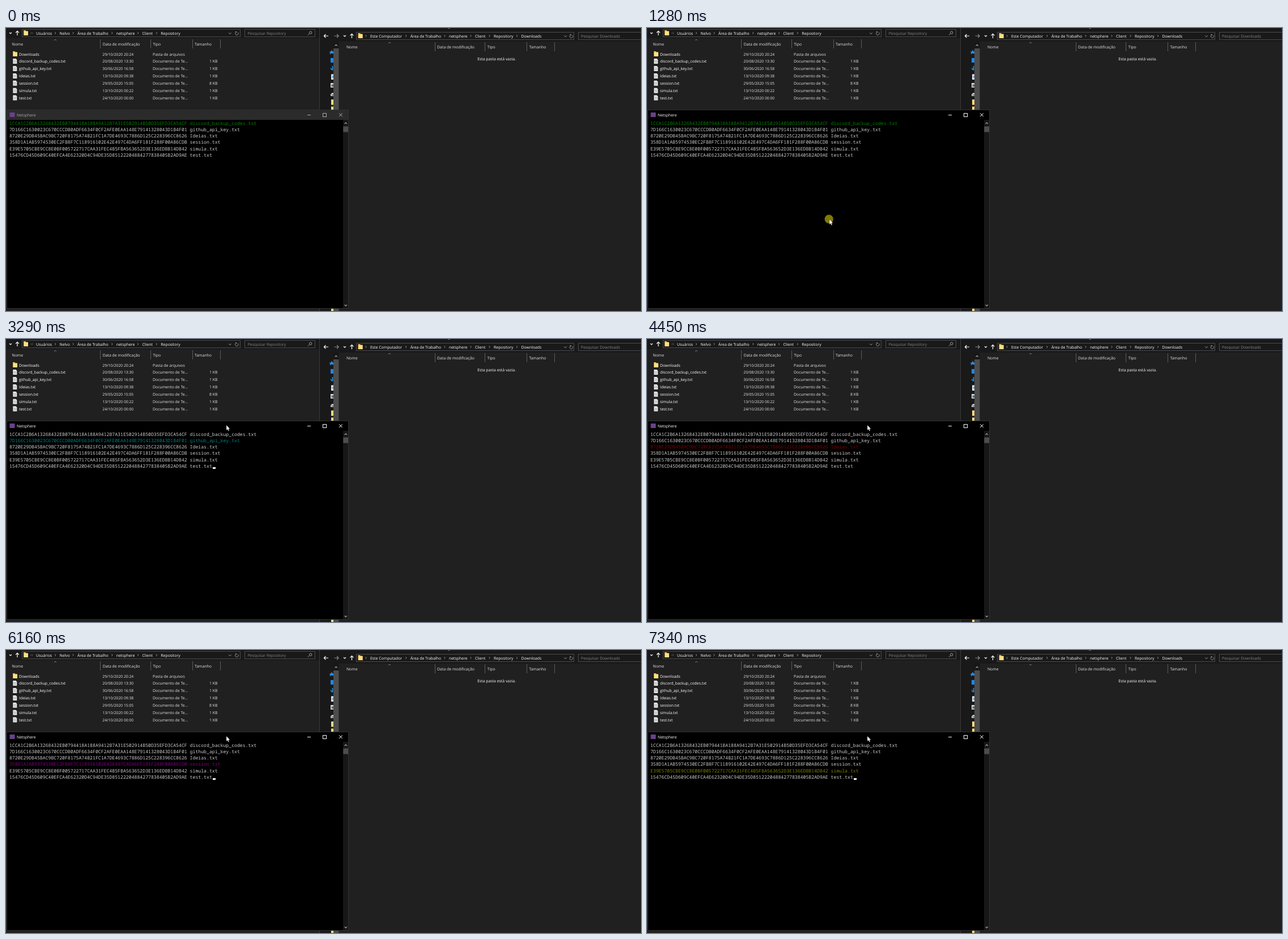
These frames come from a looping animation (1121x499 px, 8000 ms). An HTML page:

```html
<!DOCTYPE html>
<html lang="pt">
<head>
<meta charset="utf-8">
<title>Netsphere</title>
<style>
html, body { margin: 0; width: 100%; height: 100%; overflow: hidden; background: #202020; }
svg { display: block; width: 1121px; height: 499px; }
text { font: 500 6.9px "Open Sans", "Noto Sans", sans-serif; fill: #fff; white-space: pre; text-rendering: geometricPrecision; }
.head { font-weight: 400; fill: #e4e4e4; }
.date { font-size: 6.75px; }
.dim { font-weight: 400; fill: #848484; }
.end { text-anchor: end; }
.mid { text-anchor: middle; }
.mono { font: 8.19px "Noto Sans Mono", "DejaVu Sans Mono", monospace; fill: #ccc; }

/* percent = milliseconds / 80 */
.mono, .bar, .title, .button, .caret, .click { animation: 8s step-end infinite; }
.row0 { animation-name: row0; }
.row1 { animation-name: row1; }
.row2 { animation-name: row2; }
.row3 { animation-name: row3; }
.row4 { animation-name: row4; }
.row5 { animation-name: row5; }
@keyframes row0 { 0% { fill: #008000; } 40.125%, 100% { fill: #ccc; } }
@keyframes row1 { 40.125% { fill: #008080; } 55.625%, 100% { fill: #ccc; } }
@keyframes row2 { 55.625% { fill: #800000; } 77%, 100% { fill: #ccc; } }
@keyframes row3 { 77% { fill: #800080; } 81%, 100% { fill: #ccc; } }
@keyframes row4 { 81% { fill: #808000; } 84.875% { fill: #ccc; } 91.75%, 100% { fill: #808000; } }
@keyframes row5 { 84.875% { fill: #808080; } 91.75%, 100% { fill: #ccc; } }

.bar { animation-name: bar; }
.title { animation-name: title; }
.button { animation-name: button; }
@keyframes bar { 0% { fill: #2b2b2b; } 15%, 100% { fill: #000; } }
@keyframes title { 0% { fill: #aaa; } 15%, 100% { fill: #fff; } }
@keyframes button { 0% { stroke: #aaa; } 15%, 100% { stroke: #fff; } }

.caret { animation-name: caret; }
@keyframes caret {
  0%, 29.5%, 40.125%, 48.75%, 69.5% { opacity: 0; }
  22.875%, 36.125%, 41.125%, 56.625%, 75.125%, 100% { opacity: 1; }
}
.click { animation-name: click; }
@keyframes click { 0%, 17%, 100% { opacity: 0; } 15% { opacity: 1; } }

.mouse { animation: mouse 8s step-end infinite; }
@keyframes mouse {
  0% { opacity: 0; transform: translate(345px, 492px); }
  9.25% { opacity: 1; transform: translate(345px, 492px); animation-timing-function: steps(5); }
  14.125% { opacity: 1; transform: translate(322px, 337.3px); }
  18.75% { opacity: 1; transform: translate(322px, 337.3px); animation-timing-function: steps(10, start); }
  28.25% { opacity: 1; transform: translate(379.3px, 151.8px); }
  28.5% { opacity: 1; transform: translate(381px, 143px); }
  29.5% { opacity: 1; transform: translate(379.3px, 151.8px); }
  32.375% { opacity: 1; transform: translate(384px, 151.8px); }
  33.25%, 100% { opacity: 1; transform: translate(389px, 151.8px); }
}
</style>
</head>
<body>
<svg id="stage" viewBox="0 0 1121 499"></svg>
<script>
const parts = [];
const rect = (x, y, w, h, fill, extra = '') =>
  parts.push(`<rect x="${x}" y="${y}" width="${w}" height="${h}" fill="${fill}" ${extra}/>`);
const frame = (x, y, w, h, stroke, fill = 'none', cls = '') =>
  rect(x + .5, y + .5, w - 1, h - 1, fill, `stroke="${stroke}" class="${cls}"`);
const line = (d, stroke = '#fff', width = 1, cls = '') =>
  parts.push(`<path d="${d}" fill="none" stroke="${stroke}" stroke-width="${width}" class="${cls}"/>`);
const shape = (d, fill) => parts.push(`<path d="${d}" fill="${fill}"/>`);
// y is the middle of the capitals
const text = (x, y, str, cls = '') =>
  parts.push(`<text x="${x}" y="${y + 2.5}" class="${cls}">${str}</text>`);

const down = (x, y, c, s = 2.2, w = 1) => line(`M${x - s} ${y - s / 2}l${s} ${s} ${s} ${-s}`, c, w);
const up = (x, y, c, s = 2.2, w = 1) => line(`M${x - s} ${y + s / 2}l${s} ${-s} ${s} ${s}`, c, w);
const next = (x, y) => line(`M${x - .8} ${y - 1.7}l1.7 1.7 -1.7 1.7`, '#bbb', .8);
const upArrow = (x, y) => line(`M${x} ${y + 4}v-7.5M${x - 3} ${y - .6}l3 -3 3 3`, '#fff', 1.2);
const sideArrow = (x, y, dir, c) => line(`M${x - 4 * dir} ${y}h${7.6 * dir}m${-3 * dir} -3l${3 * dir} 3 ${-3 * dir} 3`, c, 1.2);
const refresh = (x, y) => line(`M${x + 2} ${y - 1.8}A2.8 2.8 0 1 1 ${x - 1.4} ${y - 2.4}M${x - 2.6} ${y - 3}h2v2`, '#aaa', .8);
const folder = (x, y) => {
  shape(`M${x} ${y}h3.6l1 1.4h3.4v7.6h-8z`, '#e8b84a');
  rect(x + 1, y + 1.8, 7, 7.2, '#ffdf86');
};
const file = (x, y) => {
  shape(`M${x} ${y}h5l2 2v7h-7z`, '#e9e9e9');
  for (let i = 0; i < 3; i++) line(`M${x + 1.3} ${y + 3.2 + i * 1.7}h4.4`, '#8d8d8d', .6);
};
const crumbs = (y, items) => items.forEach(([x, label], i) => {
  if (i) next(x - 7.5, y);
  text(x, y, label);
});
const columns = (x, y, sortX) => {
  [['Nome', 10.5], ['Data de modificação', 170.7], ['Tipo', 259.3], ['Tamanho', 333]]
    .forEach(([label, dx]) => text(x + dx, y, label, 'head'));
  [166.4, 255, 329, 378].forEach(dx => rect(Math.round(x + dx), y - 8, 1, 16, '#5c5c5c'));
  up(sortX, y - 7, '#999', 2, .8);
};

function leftExplorer() {
  rect(0, 0, 553, 18, '#191919');
  frame(28, 2, 386, 14, '#4c4c4c', '#191919');
  frame(421, 2, 125, 14, '#4c4c4c', '#191919');
  down(8, 9, '#fff', 2, 1.1);
  upArrow(20, 9);
  folder(31, 4);
  line('M45 7.5l-1.5 1.5 1.5 1.5M47.4 7.5l-1.5 1.5 1.5 1.5', '#777', .7);
  crumbs(9, [[53, 'Usuários'], [94.5, 'Nelvo'], [126, 'Área de Trabalho'], [194.7, 'netsphere'], [240.5, 'Client'], [273.3, 'Repository']]);
  down(395.5, 9.5, '#aaa');
  refresh(407.5, 9.5);
  text(426.7, 9, 'Pesquisar Repository', 'dim');
  line('M533 12.5l2.6-2.8M535.5 8.2a2.2 2.2 0 1 0 4.4 0a2.2 2.2 0 1 0-4.4 0', '#aaa', .9);
  columns(0, 28, 87);

  const rows = [
    ['Downloads', '29/10/2020 20:24'],
    ['discord_backup_codes.txt', '20/08/2020 13:30', 1],
    ['github_api_key.txt', '30/06/2020 16:58', 1],
    ['Ideias.txt', '13/10/2020 09:38', 1],
    ['session.txt', '29/05/2020 15:05', 8],
    ['simula.txt', '13/10/2020 00:22', 1],
    ['test.txt', '24/10/2020 00:00', 1]
  ];
  rows.forEach(([name, date, size], i) => {
    const y = 46 + i * 12.9;
    size ? file(12.3, y - 4.8) : folder(12, y - 5);
    text(23, y, name);
    text(170.3, y, date, 'date head');
    text(259, y, size ? 'Documento de Te...' : 'Pasta de arquivos', 'head');
    if (size) text(373.5, y, size + ' KB', 'end head');
  });
}

function rightExplorer() {
  rect(553, 0, 568, 499, '#202020');
  rect(553, 0, 568, 24, '#191919');
  rect(553, 24, 25, 475, '#191919');
  rect(553, 0, 1, 499, '#3a3a3a');
  line('M780 0l2 1 2-1', '#999', .8);
  sideArrow(565, 14, -1, '#fff');
  sideArrow(583.5, 14, 1, '#8a8a8a');
  down(598, 14, '#fff', 2, 1.1);
  upArrow(610.5, 14);
  frame(618, 7, 385, 14, '#4c4c4c', '#191919');
  frame(1010, 7, 120, 14, '#4c4c4c', '#191919');
  folder(621.5, 9);
  next(635.5, 14);
  crumbs(14, [[643, 'Este Computador'], [713.7, 'Área de Trabalho'], [782, 'netsphere'], [828, 'Client'], [861, 'Repository'], [909.5, 'Downloads']]);
  down(987.5, 14.5, '#aaa');
  refresh(998, 14.5);
  text(1015, 14, 'Pesquisar Downloads', 'dim');
  columns(590.4, 33, 677);
  text(866, 54.5, 'Esta pasta está vazia.', 'mid');

  // navigation pane, cut off by its scroll bar
  shape('M570 42l3.4-.6 1.6-3 1.6 3h1.4v4l-3-1-3.5 2 1-3.2z', '#2f8fe0');
  rect(573, 53, 5, 8, '#1e88e5');
  line('M576.5 67v7M573 71l3.5 3.5', '#1e9bf0', 1.6);
  rect(574, 81.5, 4, 9.5, '#e4eef6');
  rect(575.5, 84, 2.5, 4, '#7fa9cc');
  rect(573, 97, 5, 8, '#d5dadd');
  rect(574.5, 99.5, 3.5, 4, '#586a70');
  shape('M573 120v-3l2.5-2.5h2.5v5.5z', '#d0d0d0');
  rect(574.5, 117.5, 3.5, 1.2, '#444');
  [126, 138.5, 494].forEach(y => rect(574, y, 4, 9.5, '#ffdb7d'));
  rect(578, 24, 9.5, 475, '#171717');
  rect(578, 36, 9.5, 463, '#4d4d4d');
  up(582.7, 30.5, '#999', 2.2, 1.1);
}

function consoleWindow() {
  rect(1, 144, 604, 350.5, '#000');
  rect(1, 144, 604, 18, '#000', 'class="bar"');
  rect(6.5, 149, 9, 8, '#68418c');
  text(19, 153.2, 'Netsphere', 'title');
  line('M532 153.5h6', '#fff', 1, 'button');
  frame(559, 150, 7, 7, '#fff', 'none', 'button');
  line('M588 150.3l5.8 5.8M593.8 150.3l-5.8 5.8', '#fff', 1, 'button');
  rect(595, 162, 9.4, 332, '#171717');
  rect(595.3, 173.5, 9, 10, '#4d4d4d');
  up(599.8, 168, '#aaa', 2.2, 1.1);
  down(599.8, 489, '#aaa', 2.2, 1.1);
  frame(1, 144, 604, 351, '#303030');

  const lines = [
    '1CCA1C2B6A13268432EB0794418A188A9412B7A31E502914B50D35EFD3CA54CF discord_backup_codes.txt',
    '7D166C1630023C670CCCDB0ADF6634F0CF2AFE0EAA148E79141328043D1B4F01 github_api_key.txt',
    '8720E29DB45BAC9BC720F8175A74B21FC1A7DE4693C7886D125C228396CC8626 Ideias.txt',
    '358D1A1AB5974530EC2FB8F7C118916102E42E497C4DA6FF181F288F00A86CDB session.txt',
    'E39E5705CBE9CC8E0BF005722717CAA31FEC4B5FBA563652D3E136EDBB14DB42 simula.txt',
    '15476CD45D609C40EFCA4E62320D4C94DE35D85122204884277838405B2AD9AE test.txt'
  ];
  lines.forEach((str, i) => text(5.9, 168.8 + i * 11.05, str, 'mono row' + i));
  rect(365, 226, 5, 3, '#fff', 'class="caret"');
}

function pointer() {
  parts.push('<circle class="click" cx="321.2" cy="336.8" r="7.6" fill="#807a00"/>');
  parts.push('<path class="mouse" d="M0 0v9.2l2.1-1.9 1.5 3.2 1.5-.7-1.4-3.1h2.8z" fill="#fff" stroke="#000" stroke-width=".3"/>');
}

rect(0, 0, 1121, 499, '#202020');
leftExplorer();
rightExplorer();
consoleWindow();
pointer();
document.getElementById('stage').innerHTML = parts.join('');
</script>
</body>
</html>
```
